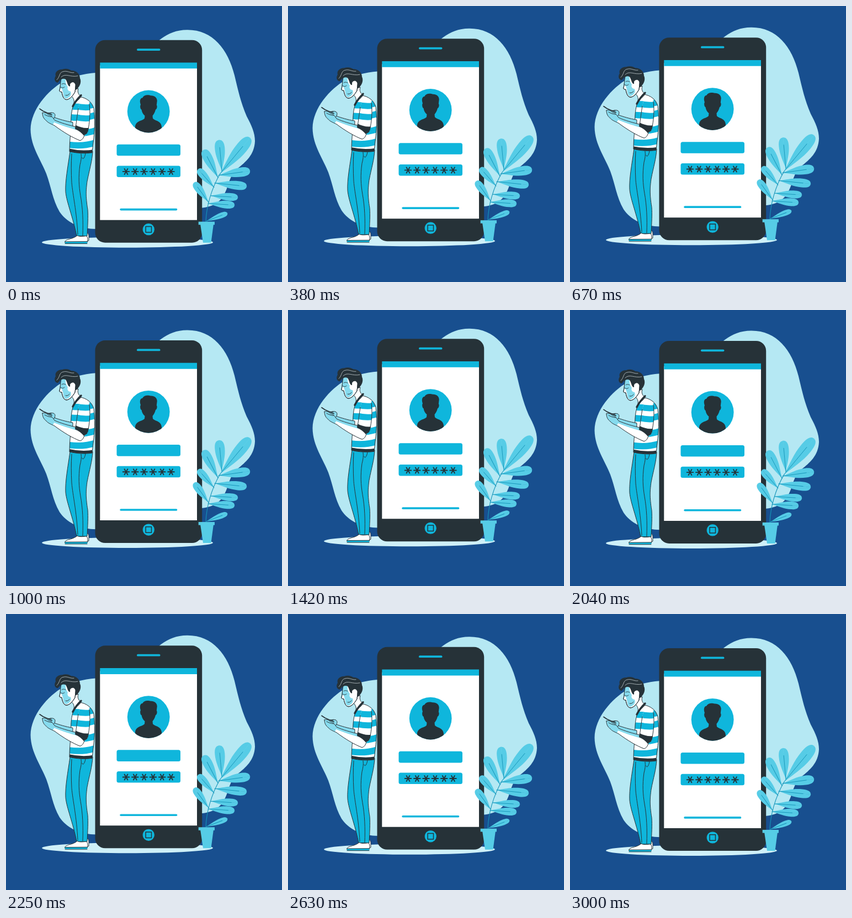
An HTML page with a canvas that plays this animation: 500 px wide and 500 px high, repeating every 3040 ms.

```html
<!DOCTYPE html>
<html lang="en">
<head>
<meta charset="utf-8">
<title>Login screen</title>
<style>
html, body { margin: 0; width: 100%; height: 100%; overflow: hidden; background: #184f8f; }
canvas { display: block; width: 500px; height: 500px; }
</style>
</head>
<body>
<canvas id="stage"></canvas>
<script>
const canvas = document.getElementById('stage');
const ctx = canvas.getContext('2d');
const ratio = window.devicePixelRatio || 1;
canvas.width = canvas.height = 500 * ratio;

const BG = '#184f8f', DARK = '#263238', CYAN = '#0fb6dc', PALE = '#b5e8f3',
      GROUND = '#cff0f8', LEAF = '#56cce6', VEIN = '#1594b8', SKIN = '#86dbee', WHITE = '#fff';
const LOOP = 3040, CYCLE = 3000, LEAD = 42, RISE = 10;

function fill(d, color) {
  ctx.fillStyle = color;
  ctx.fill(new Path2D(d));
}

function line(d, color = DARK, width = 1) {
  ctx.strokeStyle = color;
  ctx.lineWidth = width;
  ctx.stroke(new Path2D(d));
}

function shape(d, color, width = 1) {
  fill(d, color);
  line(d, DARK, width);
}

function box(x, y, w, h, r, color) {
  ctx.fillStyle = color;
  ctx.beginPath();
  ctx.roundRect(x, y, w, h, r);
  ctx.fill();
}

function oval(x, y, rx, ry, color) {
  ctx.fillStyle = color;
  ctx.beginPath();
  ctx.ellipse(x, y, rx, ry, 0, 0, Math.PI * 2);
  ctx.fill();
}

function clipped(d, draw) {
  ctx.save();
  ctx.clip(new Path2D(d));
  draw();
  ctx.restore();
}

function backdrop() {
  fill('M328 43.5C374 43 402 78 414 126C421 155 425 174 436 200C445 217 451 230 451 245' +
    'C450 270 434 283 419 295C404 308 404 325 397 338C390 355 374 365 352 366' +
    'C310 368 280 405 215 408C192 409 178 404 158 404C132 403 109 391 97 373' +
    'C84 350 82 328 73 304C64 280 45 256 44.5 224C45 188 76 153 104 137' +
    'C124 126 150 121 170 121L250 90C268 70 290 43.5 328 43.5Z', PALE);
  oval(220, 428.5, 155, 9.5, GROUND);
}

function asterisk(x, y) {
  for (let i = 0; i < 3; i++) {
    const a = i * Math.PI / 3;
    const dx = Math.cos(a) * 5.8, dy = Math.sin(a) * 5.8;
    line(`M${x - dx} ${y - dy}L${x + dx} ${y + dy}`, DARK, 1.9);
  }
}

function phone() {
  box(161.5, 62, 193.7, 367, 18, DARK);
  box(170.3, 108, 175.7, 280, 0, WHITE);
  box(170.3, 102.8, 175.7, 10.8, 0, CYAN);
  box(237, 77.5, 42.5, 3.8, 1.9, CYAN);

  oval(258.2, 191.3, 38.4, 38.4, CYAN);
  ctx.save();
  ctx.beginPath();
  ctx.arc(258.2, 191.3, 38.4, 0, Math.PI * 2);
  ctx.clip();
  fill('M244 179C241.5 172 243 167 247.5 166.5C250 161 258 161 262 162.5C269 162 275 167 273.5 174' +
    'L272.8 180C274.5 181 273.5 187.5 271 188C270 193 267 197 265.5 199L266 204' +
    'C271 209 281 208 282 219L282 232H234V219C235 208 246 209 251 204' +
    'L251.5 199C248 196 246.5 193 245.5 188C243 187.5 242.5 181 244 179Z', DARK);
  ctx.restore();

  box(200.5, 251, 115.5, 20.6, 3.5, CYAN);
  box(200.5, 289.8, 115.5, 20.4, 3.5, CYAN);
  for (let i = 0; i < 6; i++) asterisk(217.5 + i * 16.3, 300.2);
  box(206.3, 367.1, 104, 3.6, 1.8, CYAN);

  oval(258.3, 405, 10.6, 10.6, CYAN);
  ctx.strokeStyle = DARK;
  ctx.lineWidth = 1.5;
  ctx.strokeRect(253.1, 399.8, 10.4, 10.4);
}

function legs() {
  shape('M144 411C147 409 150 413 150 417L150 425L144 428Z', WHITE);
  shape('M116 264C112 292 107 318 108 337C110 357 121 381 128 417L147 417' +
    'C148 396 149 383 148 369C144 344 145 333 147 318C151 297 156 282 157 264Z', CYAN);
  line('M136 268C137 274 136 281 134 288C131 310 132 326 135 344C139 366 140 390 139 416');
  line('M119 268C118 285 118 302 119 320C121 343 128 372 130 414M138 275C139 280 143 275 144 267');
  shape('M129 416C133 419 142 417 146 417C149 421 148 426 147 429L107 429.5' +
    'C105 424 114 423 120 421C125 419 127 418 129 416Z', WHITE);
  fill('M107 427.3L147.5 427L147 430.8L107 430.8Z', CYAN);
  line('M107 427.3L147.5 427M107 430.8H147');
}

function torso() {
  const body = 'M135 165C146 167 156 174 159 186C161 201 161 214 160 228C159 243 157 254 156 266' +
    'C143 268 128 267 115 264C115 247 117 232 118 216C117 202 119 190 122 180C125 173 129 168 135 165Z';
  fill(body, WHITE);
  clipped(body, () => {
    for (const y of [181, 201, 229, 251])
      line(`M110 ${y}Q140 ${y + 5} 165 ${y - 4}`, CYAN, 11.5);
    line('M112 261Q136 267 160 263', DARK, 5.5);
  });
  line(body);
}

function farArm() {
  shape('M87 202C96 205 108 209 121 211L121 221C105 217 92 212 83 207Z', SKIN);
  shape('M74 198C77 193 82 193 86 194C90 196 89 199 88 202L84 207L74 205Z', SKIN);
}

function nearArm() {
  const arm = 'M66 194C71 192 74 195 78 198C82 198 85 203 88 207C99 212 113 216 130 220' +
    'L143 229C142 237 139 243 134 244C121 239 104 229 88 217C82 214 76 212 73 208C69 205 66 201 66 194Z';
  fill(arm, WHITE);
  clipped(arm, () => fill('M60 190L86 198L130 216L134 226C115 222 100 216 87 211L84 218L60 212Z', SKIN));
  line(arm);
  line('M61 186.5L67 190.5L83 197.5', DARK, 1.7);
  line('M70 197C74 199 78 201 83 201M76 194L82 194.5');

  const sleeve = 'M133 176C137 167 147 167 151 176C154 193 152 209 148 228L142 235L126 221Z';
  fill(sleeve, WHITE);
  clipped(sleeve, () => {
    for (const y of [180, 200])
      line(`M120 ${y}Q138 ${y + 6} 157 ${y + 3}`, CYAN, 11);
  });
  line('M151 178C153 194 152 210 148 228M131 186C129 198 128 208 126 221');
  fill('M126 216C134 220 142 222 150 221L147 231L141 235C137 230 132 226 125 223Z', DARK);
}

function head() {
  shape('M113 161C117 162 122 157 125 151L131 150C129 156 131 161 136 164C134 169 127 173 123 176C124 170 122 167 119 164Z', WHITE);
  line('M136 162C130 168 125 174 121 182', DARK, 3.5);
  const face = 'M100 132C98 140 99 147 97 153C96 155 99 156 101 156C102 162 104 170 110 170' +
    'C116 169 121 163 125 156L127 137L114 130Z';
  shape(face, WHITE);
  clipped(face, () => {
    fill('M94 130L108 131C107 138 109 143 112 147C110 151 113 155 117 155' +
      'C119 160 117 165 110 168C104 169 104 161 103 156L101 150L94 146Z', SKIN);
  });
  line(face);
  fill('M94 139C89 139 86 133 90 127C88 121 93 115 102 115C108 112.5 116 115 118 117' +
    'C127 117 134 123 134 131C138 139 132 149 126 152.5C125 148 127 143 124 140' +
    'C120 136 116 141 116 146C111 145 112 139 108 133C104 131 99 132 94 139Z', DARK);
  fill('M116 142C119 136 125 139 124.5 144C124 149 121 153 118 151Z', WHITE);
  line('M92 134C98 129 96 120 104 119C111 117 116 122 123 121M100 129C108 121 116 130 130 127', '#d9e1e4', .7);
  line('M99 147C101 149 104 149 106 147M101 142C103 140 106 141 108 142M108 162C111 163 114 161 115 159');
}

// Teardrop from base to tip, widest near the tip.
function leaf(bx, by, tx, ty, w) {
  const len = Math.hypot(tx - bx, ty - by);
  const side = s => `C${len * .28} ${s * w * .23} ${len * .46} ${s * w * .5} ${len * .73} ${s * w * .5}` +
    `C${len * .92} ${s * w * .5} ${len} ${s * w * .32} ${len} 0`;
  ctx.save();
  ctx.translate(bx, by);
  ctx.rotate(Math.atan2(ty - by, tx - bx));
  fill('M0 0' + side(-1), LEAF);
  fill('M0 0' + side(1), LEAF);
  line(`M0 0H${len}`, LEAF, .6);
  line(`M0 0H${len * .76}`, VEIN, .9);
  ctx.restore();
}

function plant() {
  leaf(388, 304, 442, 239, 21);
  leaf(391, 299, 386, 243, 18);
  leaf(384, 311, 358, 261, 17);
  leaf(377, 329, 348, 296, 14);
  leaf(367, 356, 341, 320, 14);
  leaf(385, 307, 442, 299, 17);
  leaf(378, 321, 436, 327, 16);
  leaf(371, 344, 420, 347, 14);
  leaf(366, 358, 414, 361, 14);
  leaf(363, 390, 401, 375.5, 10);
  line('M362 391C363 365 371 333 388 304', VEIN, 1.1);
  fill('M352 395H376L371.5 429H357Z', LEAF);
  box(348.7, 391, 29.3, 5.6, 0, LEAF);
}

function lift(ms) {
  const p = Math.min(ms + LEAD, CYCLE) / CYCLE;
  return -RISE * (1 - Math.abs(1 - 2 * p));
}

function draw(ms) {
  ctx.setTransform(ratio, 0, 0, ratio, 0, 0);
  ctx.fillStyle = BG;
  ctx.fillRect(0, 0, 500, 500);
  ctx.lineCap = ctx.lineJoin = 'round';
  ctx.translate(0, lift(ms));
  backdrop();
  phone();
  legs();
  torso();
  farArm();
  nearArm();
  head();
  plant();
}

const start = performance.now();
function tick() {
  draw((performance.now() - start) % LOOP);
  requestAnimationFrame(tick);
}
tick();
</script>
</body>
</html>
```
